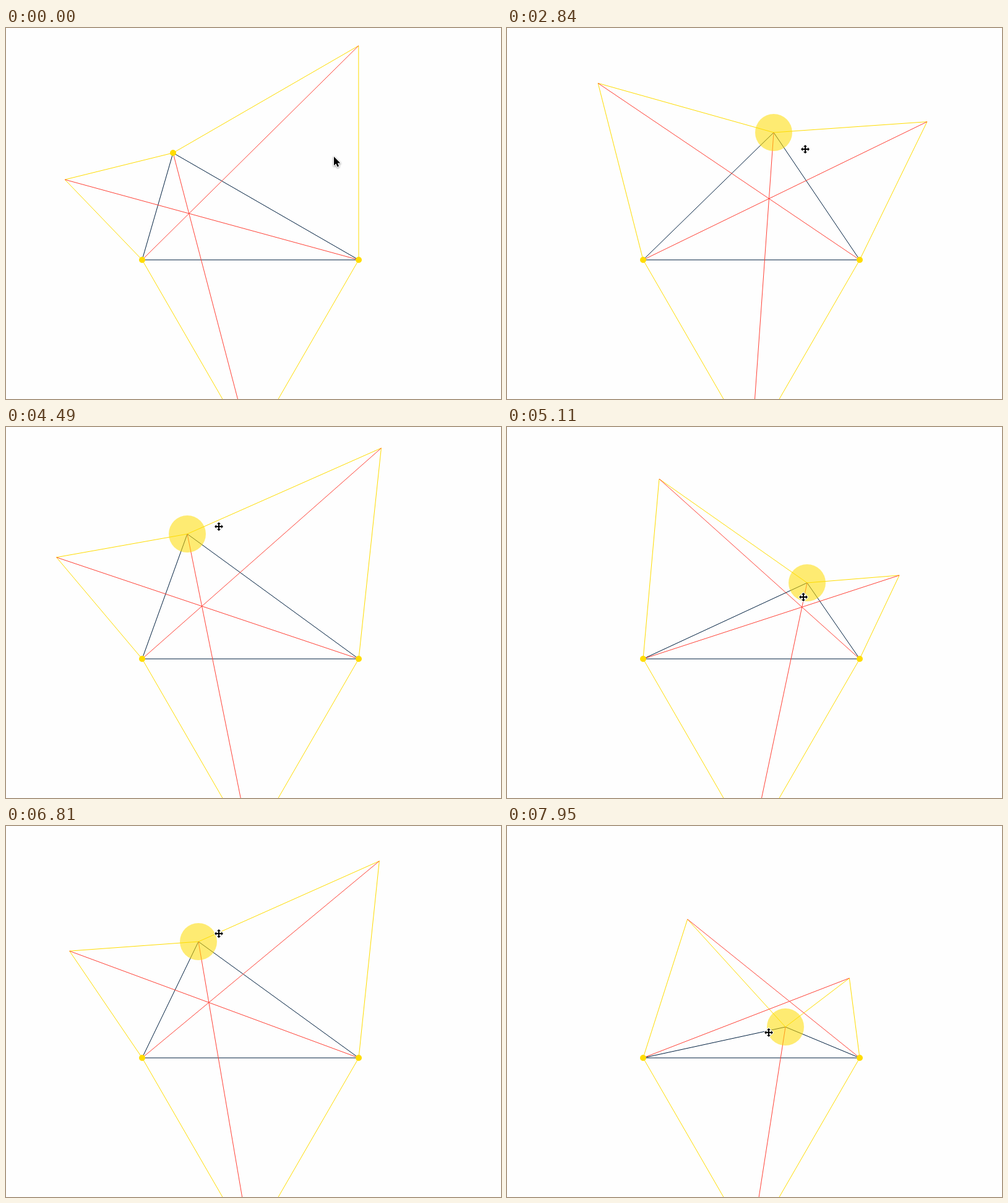
An HTML page with a canvas for the animation above (8000 ms loop, 800x600 px).

```html
<!DOCTYPE html>
<html lang="en">
<head>
<meta charset="utf-8">
<title>Equilateral triangles on a draggable triangle</title>
<style>
  html, body { margin: 0; width: 100%; height: 100%; overflow: hidden; background: #fefefe; }
  canvas { display: block; }
</style>
</head>
<body>
<canvas width="800" height="600"></canvas>
<script>
const ctx = document.querySelector('canvas').getContext('2d');
const LOOP = 8000, HOVER = 1080, DRAG = 2190, LEAD = 150;
const NAVY = '#001f3f', YELLOW = '#ffdc00', RED = '#ff4136';
const B = [220, 375], C = [570, 375];

// Path of the dragged corner: time, x, y. The pointer runs ahead of it by LEAD.
const path = [
  [2050, 270, 202], [2190, 272, 198], [2330, 281, 175], [2460, 310, 160],
  [2590, 352, 151], [2710, 392, 152], [2840, 431, 169], [2990, 482, 196],
  [3170, 490, 250], [3350, 463, 297], [3500, 423, 325], [3640, 375, 335],
  [3780, 325, 325], [3920, 280, 300], [4060, 248, 268], [4200, 234, 227],
  [4340, 243, 191], [4490, 293, 173], [4640, 344, 161], [4790, 405, 157],
  [4950, 462, 190], [5110, 485, 252], [5260, 479, 275], [5440, 436, 318],
  [5590, 388, 336], [5740, 345, 335], [5890, 310, 322], [6040, 281, 300],
  [6190, 263, 275], [6350, 256, 250], [6510, 262, 226], [6660, 285, 198],
  [6810, 311, 187], [6960, 344, 174], [7240, 415, 163], [7380, 447, 178],
  [7650, 495, 250], [7800, 479, 295], [7950, 450, 325], [8100, 423, 334]
];

// The picture refreshes in steps: first time, last time, number of steps.
const runs = [[0, 0, 1], [360, 1380, 11], [2190, 2840, 6], [3020, 3170, 2], [3350, 4340, 8],
  [4490, 5110, 5], [5290, 5440, 2], [5590, 6510, 8], [6660, 6810, 2], [6960, 7650, 6], [7800, 7950, 2]];
const ticks = runs.flatMap(([from, to, n]) =>
  Array.from({ length: n }, (_, i) => from + (n > 1 ? (to - from) * i / (n - 1) : 0)));

const clamp = v => Math.max(0, Math.min(1, v));
const smooth = v => v * v * (3 - 2 * v);

function slope(i, k) {
  const a = path[Math.max(0, i - 1)], b = path[Math.min(path.length - 1, i + 1)];
  return (b[k] - a[k]) / (b[0] - a[0]);
}

function pathAt(t) {
  if (t <= path[0][0]) return path[0].slice(1);
  const i = Math.max(0, Math.min(path.findIndex(p => p[0] > t), path.length) - 1);
  if (t >= path[path.length - 1][0]) return path[path.length - 1].slice(1);
  const p = path[i], q = path[i + 1], h = q[0] - p[0], u = (t - p[0]) / h;
  const s = smooth(u);
  return [1, 2].map(k => p[k] * (1 - s) + q[k] * s
    + h * u * (1 - u) * ((1 - u) * slope(i, k) - u * slope(i + 1, k)));
}

// Third corner of the equilateral triangle standing on the side p to q.
function apex(p, q) {
  const k = Math.sqrt(3) / 2;
  return [(p[0] + q[0]) / 2 + k * (q[1] - p[1]), (p[1] + q[1]) / 2 - k * (q[0] - p[0])];
}

function line(color, ...points) {
  ctx.beginPath();
  points.forEach(p => ctx.lineTo(...p));
  ctx.strokeStyle = color;
  ctx.lineWidth = 1;
  ctx.stroke();
}

function dot([x, y], r, alpha = 1) {
  ctx.globalAlpha = alpha;
  ctx.fillStyle = YELLOW;
  ctx.beginPath();
  ctx.arc(x, y, r, 0, 2 * Math.PI);
  ctx.fill();
  ctx.globalAlpha = 1;
}

const arrow = new Path2D('M0 0V14.4L3.3 11.3L5.6 16.6L8 15.6L5.8 10.4H10.3Z');
const arm = 'M0 -7L3 -4H1V-1H4V-3L7 0L4 3V1H1V4H3L0 7L-3 4H-1V1H-4V3L-7 0L-4 -3V-1H-1V-4H-3Z';
const move = new Path2D(arm);

function pointer([x, y], shape) {
  ctx.save();
  ctx.translate(x, y);
  ctx.lineJoin = 'round';
  ctx.lineWidth = 2;
  ctx.strokeStyle = '#fff';
  if (shape === arrow) {
    ctx.shadowColor = 'rgba(0,0,0,.45)';
    ctx.shadowBlur = 3;
    ctx.shadowOffsetY = 1;
  }
  ctx.stroke(shape);
  ctx.shadowColor = 'transparent';
  ctx.fillStyle = '#000';
  ctx.fill(shape);
  ctx.restore();
}

function draw(t) {
  const A = pathAt(t);
  const left = apex(B, A), right = apex(A, C), bottom = apex(C, B);
  ctx.fillStyle = '#fefefe';
  ctx.fillRect(0, 0, 800, 600);

  line(NAVY, A, B, C, A);
  line(YELLOW, B, left, A);
  line(YELLOW, A, right, C);
  line(YELLOW, C, bottom, B);
  line(RED, A, bottom);
  line(RED, B, right);
  line(RED, C, left);

  const grow = smooth(clamp((t - HOVER) / 300));
  dot(B, 5);
  dot(C, 5);
  dot(A, 5 + 25 * grow, 1 - 0.45 * grow);

  const approach = smooth(clamp((t - 260) / (HOVER - 260)));
  const hand = t < DRAG ? [530 - 261 * approach, 208 - 8 * approach] : pathAt(t + LEAD);
  pointer(hand, t < HOVER ? arrow : move);
}

function frame(now) {
  const t = now % LOOP;
  draw(ticks.filter(tick => tick <= t + 0.5).pop());
  requestAnimationFrame(frame);
}
requestAnimationFrame(frame);
</script>
</body>
</html>
```
